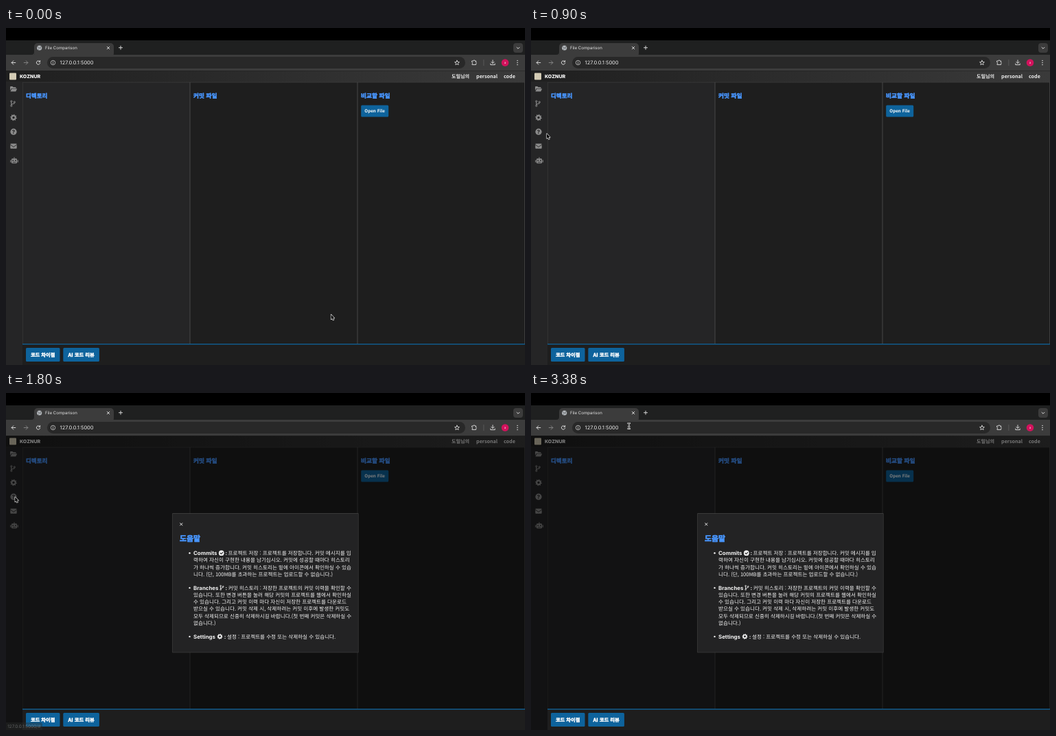
An HTML page with a canvas that plays this animation: 756 by 491 pixels, repeating every 3550 ms.

```html
<!DOCTYPE html>
<html lang="ko">
<head>
<meta charset="utf-8">
<title>File Comparison</title>
<style>
html, body { margin: 0; width: 100%; height: 100%; overflow: hidden; background: #000; }
canvas { display: block; width: 756px; height: 491px; }
</style>
</head>
<body>
<canvas id="stage"></canvas>
<script>
const W = 756, H = 491, LOOP = 3550;
const KR = '"Noto Sans CJK KR", "Noto Sans CJK JP", "Noto Sans CJK", sans-serif';
const UI = 'Inter, "Liberation Sans", sans-serif';
const BLUE = '#0e639c', LINK = '#4896ff', ICON = '#8b8b8b', SIDE = '#252526';

const canvas = document.getElementById('stage');
const dpr = window.devicePixelRatio || 1;
canvas.width = W * dpr;
canvas.height = H * dpr;
const c = canvas.getContext('2d');

function rect(x, y, w, h, fill, r = 0) {
  c.fillStyle = fill;
  c.beginPath();
  c.roundRect(x, y, w, h, r);
  c.fill();
}

function disc(x, y, r, fill) {
  c.fillStyle = fill;
  c.beginPath();
  c.arc(x, y, r, 0, 7);
  c.fill();
}

function text(s, x, y, size, color, family = KR, weight = 400, align = 'left') {
  c.font = `${weight} ${size}px ${family}`;
  c.fillStyle = color;
  c.textAlign = align;
  c.fillText(s, x, y);
}

// Extra heavy display lettering.
function heavy(s, x, y, size, color, align = 'left') {
  text(s, x, y, size, color, KR, 900, align);
  c.strokeStyle = color;
  c.lineWidth = size * 0.06;
  c.lineJoin = 'round';
  c.strokeText(s, x, y);
}

// Draws an SVG path around (x, y), filled and/or stroked.
function shape(d, x, y, fill, stroke, width = 1) {
  const p = new Path2D(d);
  c.save();
  c.translate(x, y);
  c.lineWidth = width;
  c.lineCap = c.lineJoin = 'round';
  if (stroke) { c.strokeStyle = stroke; c.stroke(p); }
  if (fill) { c.fillStyle = fill; c.fill(p, 'evenodd'); }
  c.restore();
}

function line(d, x, y, color, width = 1) {
  shape(d, x, y, null, color, width);
}

function ring(x, y, r, color, width = 0.9) {
  c.strokeStyle = color;
  c.lineWidth = width;
  c.beginPath();
  c.arc(x, y, r, 0, 7);
  c.stroke();
}

function gear(x, y, r, color) {
  c.fillStyle = color;
  c.beginPath();
  for (let i = 0; i < 32; i++) {
    const a = (i + 0.5) / 32 * Math.PI * 2;
    const d = i % 4 < 2 ? r : r * 0.76;
    c.lineTo(x + d * Math.cos(a), y + d * Math.sin(a));
  }
  c.closePath();
  c.moveTo(x + r * 0.36, y);
  c.arc(x, y, r * 0.36, 0, 7);
  c.fill('evenodd');
}

function branch(x, y, k, color) {
  c.save();
  c.translate(x, y);
  c.scale(k, k);
  ring(-2.2, -3.2, 1.1, color, 1);
  ring(-2.2, 3.3, 1.1, color, 1);
  ring(2.3, -2, 1.1, color, 1);
  line('M-2.2-2V2.1M2.3-.8C2.3 1-2.2 0-2.2 1.9', 0, 0, color, 1.1);
  c.restore();
}

function cross(x, y, r, color, width = 0.9) {
  line(`M${-r} ${-r}L${r} ${r}M${r} ${-r}L${-r} ${r}`, x, y, color, width);
}

function browser() {
  const fg = '#d6d6d6';
  rect(0, 0, W, H, '#000');
  rect(0, 18, W, 22, '#1f2020');
  rect(41, 22, 116, 20, '#3c3c3c', 5);
  shape('M0 0Q4 0 4-4V0zM120 0Q116 0 116-4V0z', 37, 39, '#3c3c3c');
  rect(0, 39, W, 23.5, '#3c3c3c');

  disc(48.7, 29, 3.6, '#b9bdc1');
  line('M-2.6-1.4Q-.6-1.2-.4.2T-1.6 2.4M2.6-1.6Q.4-1.6 1 0T2.2 1.8', 48.7, 29, '#4a4d50', 0.8);
  text('File Comparison', 57, 31.2, 6.1, '#e3e3e3', UI);
  cross(149, 29, 1.8, '#e3e3e3');
  line('M-2.5 0H2.5M0-2.5V2.5', 167, 28.7, fg);
  rect(739, 22, 14, 14, '#3c3c3c', 4);
  line('M-2-1L0 1L2-1', 746, 29.2, fg);

  line('M2.8 0H-2.8M-.2-2.7L-2.9 0L-.2 2.7', 11, 50.5, fg);
  line('M-2.8 0H2.8M.2-2.7L2.9 0L.2 2.7', 29, 50.5, '#828282');
  line('M2.2-1.7A2.7 2.7 0 1 0 2.7.6M2.6-3V-1.2H.8', 47, 50.5, fg);
  rect(60, 42, 609, 17, '#282828', 8.5);
  ring(68.5, 50.5, 3.2, fg, 0.8);
  line('M0-.2V1.6M0-1.6V-1.5', 68.5, 50.5, fg, 0.8);
  text('127.0.0.1:5000', 78.6, 53.1, 7.45, '#e8e8e8', UI);
  line('M0-3.3L1-1L3.4-.8L1.6.8L2.1 3.1L0 1.9L-2.1 3.1L-1.6.8L-3.4-.8L-1-1Z', 657, 50.5, fg, 0.9);
  line('M-3-2H-1.2A1.1 1.1 0 0 1 1-2H2.6V0A1.1 1.1 0 0 1 2.6 2V3.4H-3V2A1.1 1.1 0 0 0-3 0Z', 682, 50, fg);
  rect(695.5, 46, 0.8, 9, '#606060');
  line('M0-3.4V1.2M-2.1-.8L0 1.3L2.1-.8M-3.2 1.8V3.4H3.2V1.8', 709, 50.2, fg);
  disc(727, 50.5, 5.3, '#d2125c');
  text('a', 727, 52, 4.5, '#f3c3d6', UI, 500, 'center');
  [-3, 0, 3].forEach(d => disc(745, 50.5 + d, 0.8, fg));
}

function sidebar() {
  rect(0, 79, 24, H - 79, SIDE);
  shape('M-5 2V-3Q-5-4-4-4H-1.6L-.4-2.8H2.6Q3.6-2.8 3.6-1.8V-1H-2.4Q-3.2-1-3.6-.3ZM-4.6 3.6L-2.8 0Q-2.5-.4-2-.4H5.2L3.4 3.2Q3.2 3.6 2.7 3.6Z', 11, 89, ICON);
  branch(10, 110, 1, ICON);
  gear(11, 130.5, 4.8, ICON);
  disc(11, 151.2, 4.6, ICON);
  text('?', 11, 154, 7.6, SIDE, UI, 800, 'center');
  rect(6.3, 168.4, 9.4, 7.4, ICON, 1);
  line('M-4.7-1.8L0 1.5L4.7-1.8', 11, 171.8, SIDE, 0.9);
  rect(8, 190.2, 8, 7, ICON, 1.2);
  rect(11.5, 188.3, 1, 2.5, ICON);
  rect(6.2, 192.3, 1.2, 3.4, ICON, 0.5);
  rect(16.6, 192.3, 1.2, 3.4, ICON, 0.5);
  [10.2, 13.8].forEach(x => disc(x, 193, 0.9, SIDE));
  rect(9.6, 195.3, 4.8, 0.8, SIDE);
}

function page() {
  const g = c.createLinearGradient(0, 0, W, 0);
  g.addColorStop(0, '#1f1f1f');
  g.addColorStop(1, '#3a3a3a');
  rect(0, 62.5, W, 17, g);
  rect(5, 65.5, 10, 10, '#d3cbb4', 1);
  text('KOZNUR', 20, 73.4, 7, '#fff', UI, 800);
  text('도밀님의', 649, 73.2, 7.1, '#ececec', KR, 700);
  text('personal', 685, 73, 7.2, '#ececec', KR, 700);
  text('code', 725, 73, 7.2, '#ececec', KR, 700);

  rect(24, 79, 244, 382, SIDE);
  rect(268, 79, W - 268, 382, '#1e1e1e');
  rect(0, 78.8, W, 0.7, '#3d3d3d');
  sidebar();
  rect(24, 79, 0.8, 382, '#383838');
  [267.5, 511.5, 755.2].forEach(x => rect(x, 79, 1, 382, '#474747'));
  heavy('디렉토리', 29, 101.9, 8.5, LINK);
  heavy('커밋 파일', 273, 101.9, 8.7, LINK);
  heavy('비교할 파일', 517, 101.9, 8.7, LINK);
  rect(517.2, 112.5, 40, 17, BLUE, 1.5);
  text('Open File', 537.1, 123.2, 6.3, '#fff', KR, 900, 'center');
}

function footer() {
  rect(24, 460, W - 24, H - 460, '#1e1e1e');
  rect(24, 460, W - 24, 1.2, BLUE);
  rect(29, 466, 49.5, 20, BLUE, 1.5);
  rect(83.3, 466, 52.6, 20, BLUE, 1.5);
  heavy('코드 차이점', 53.7, 478.7, 7.3, '#fff', 'center');
  heavy('AI 코드 리뷰', 109.6, 478.7, 7.3, '#fff', 'center');
}

const HELP = [
  { y: 236, name: 'Commits', x: 323.6, lines: [
    '프로젝트 저장 : 프로젝트를 저장합니다. 커밋 메시지를 입',
    '력하여 자신이 구현한 내용을 남기십시오. 커밋에 성공할 때마다 히스토리',
    '가 하나씩 증가합니다. 커밋 히스토리는 밑에 아이콘에서 확인하실 수 있습',
    '니다. (단, 100MB를 초과하는 프로젝트는 업로드할 수 없습니다.)'] },
  { y: 286.6, name: 'Branches', x: 323.8, lines: [
    '커밋 히스토리 : 저장한 프로젝트의 커밋 이력을 확인할 수',
    '있습니다. 또한 변경 버튼을 눌러 해당 커밋의 프로젝트를 웹에서 확인하실',
    '수 있습니다. 그리고 커밋 이력 마다 자신이 저장한 프로젝트를 다운로드',
    '받으실 수 있습니다. 커밋 삭제 시, 삭제하려는 커밋 이후에 발생한 커밋도',
    '모두 삭제되므로 신중히 삭제하시길 바랍니다.(첫 번째 커밋은 삭제하실 수',
    '없습니다.)'] },
  { y: 357.6, name: 'Settings', x: 322, lines: [
    '설정 : 프로젝트를 수정 또는 삭제하실 수 있습니다.'] }
];

function modal() {
  const ink = '#f4f4f4';
  rect(242.3, 175.3, 271.2, 203, '#474747');
  rect(242.9, 175.9, 270, 201.8, '#232324');
  cross(255.3, 191.2, 1.7, ink);
  heavy('도움말', 253, 216.2, 10.9, LINK);
  for (const { y, name, x, lines } of HELP) {
    disc(267.5, y - 2.7, 1.2, ink);
    text(name, 273, y, 7.9, ink, UI, 700);
    text(':', x - 4.2, y, 7.9, ink, UI, 700);
    lines.forEach((s, i) => text(s, i ? 273 : x, y + i * 10.26, 7.57, ink));
  }
  disc(313.8, 233.2, 3.9, ink);
  line('M-1.8 0L-.4 1.4L2-1.1', 313.8, 233.2, '#232324', 1.1);
  branch(314.4, 283.7, 0.8, ink);
  gear(311.5, 354.8, 4, ink);
}

function tooltip(alpha) {
  c.globalAlpha = alpha;
  rect(23.3, 145.3, 22.5, 12, '#333334', 2);
  text('Help', 27.7, 153.7, 6.2, '#f4f4f4', UI);
  c.globalAlpha = 1;
}

function status(alpha) {
  c.globalAlpha = alpha;
  rect(0, 480, 53, 11, '#2c2d2d', [0, 3, 0, 0]);
  text('127.0.0.1:5000/#', 2.2, 488.2, 6.4, '#c4c6c8', UI);
  c.globalAlpha = 1;
}

const CURSORS = {
  arrow: 'M0 0V7L1.6 5.6L2.7 8.1L3.9 7.6L2.8 5.1H4.9Z',
  hand: 'M-.6 0Q.2-.6.6.2V2.6Q1.6 2 2 3Q3 2.6 3.2 3.5Q4.3 3.2 4.3 4.3V5.6L3.5 7.7H0L-2 4.6Q-1.7 3.6-.7 4.5Z',
  beam: 'M-1.6-4Q0-4 0-3Q0-4 1.6-4M0-3V3M-1.6 4Q0 4 0 3Q0 4 1.6 4M-1 .9H1'
};

// Start time, position and pointer kind.
const MOVES = [
  [0, 473.5, 417.5, 'arrow'], [100, 452, 406, 'arrow'], [200, 386, 368, 'arrow'],
  [300, 305, 321, 'arrow'], [400, 222, 272, 'arrow'], [500, 145.5, 225, 'arrow'],
  [600, 58.5, 163, 'arrow'], [700, 38, 153, 'arrow'], [800, 27, 150, 'arrow'],
  [900, 23, 154, 'arrow'], [1100, 13, 152.4, 'hand'], [1800, 13.2, 151.6, 'arrow'],
  [2600, 13.2, 152, 'arrow'], [2800, 13.2, 151.6, 'arrow'], [3380, 142.7, 48.2, 'beam']
];

function pointer(t) {
  const [, x, y, kind] = MOVES.filter(m => m[0] <= t).pop();
  if (kind === 'beam') {
    line(CURSORS.beam, x, y, '#f2f2f2', 1.7);
    line(CURSORS.beam, x, y, '#222', 0.6);
  } else {
    shape(CURSORS[kind], x, y, '#080808', '#f2f2f2', 1.2);
  }
}

function draw(t) {
  const open = t >= 1800;
  const step = Math.floor(t / 100);
  c.setTransform(dpr, 0, 0, dpr, 0, 0);
  c.textRendering = 'geometricPrecision';
  browser();
  page();
  if (!open && step >= 12) tooltip(Math.min(1, (step - 11) / 4));
  if (open) rect(0, 62.5, W, H - 62.5, 'rgba(0,0,0,.5)');
  footer();
  if (open) modal();
  if (step === 17) status(0.62);
  else if (open && step < 22) status(0.4 * (22 - step) / 4);
  pointer(t);
}

const start = performance.now();
function tick() {
  draw((performance.now() - start) % LOOP);
  requestAnimationFrame(tick);
}
tick();
</script>
</body>
</html>
```
